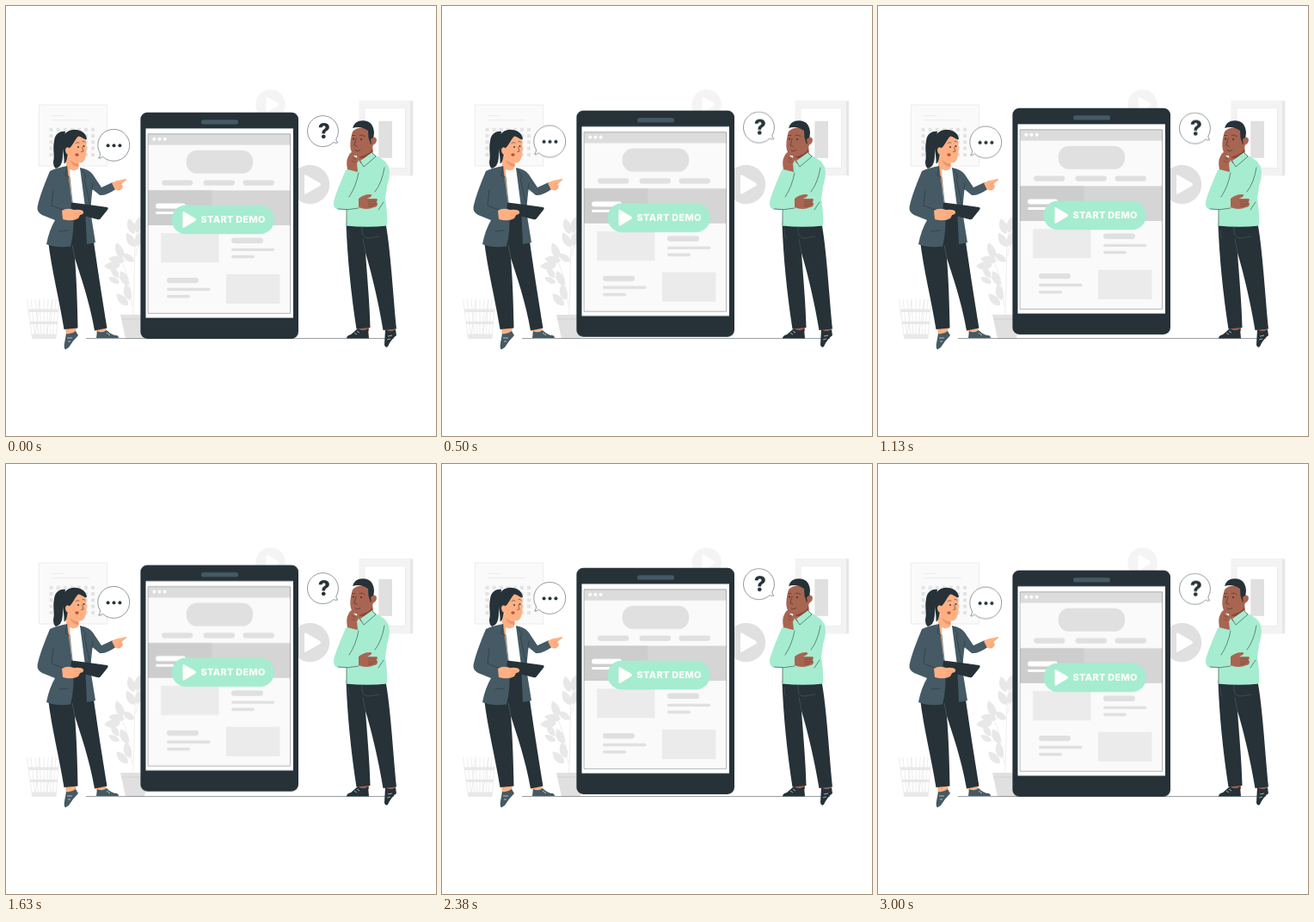
Write an HTML page that moves like this. It is 500x500 px and loops after 3.04 s.

```html
<!DOCTYPE html>
<html lang="en">
<head>
<meta charset="utf-8">
<title>Start demo</title>
<style>
  html, body { margin: 0; width: 100%; height: 100%; overflow: hidden; background: #fff; }
  svg { display: block; width: 100%; height: 100%; }
  .float { animation: float 1520ms linear infinite alternate; }
  .quick { animation-duration: 760ms; }
  @keyframes float { to { transform: translateY(-6.8px); } }

  .ink { fill: #263238; }
  .slate { fill: #455a64; }
  .peach { fill: #ffb083; }
  .brown { fill: #a86551; }
  .mint { fill: #a6ecd0; }
  .g1 { fill: #ebebeb; }
  .g2 { fill: #e0e0e0; }
  .white { fill: #fff; }
  .line { fill: none; stroke: #263238; stroke-width: .55; stroke-linecap: round; stroke-linejoin: round; }
  .pale { fill: none; stroke: #e6e6e6; stroke-width: .7; }
  .bubble { fill: #fff; stroke: #263238; stroke-width: .5; stroke-linejoin: round; }
  text { font-family: Inter, "Open Sans", sans-serif; font-weight: 800; text-anchor: middle; }
</style>
</head>
<body>
<svg viewBox="0 0 500 500">
  <defs>
    <path id="leaf" d="M0 0C-6-4-6-13 1-19C6-13 6-4 0 0Z"/>
    <path id="play" d="M-7-8.2Q-7-10.4-5-9.2L8.2-1.5Q10 0 8.2 1.5L-5 9.2Q-7 10.4-7 8.2Z"/>
  </defs>

  <!-- wall calendar -->
  <rect x="38.3" y="115" width="79.5" height="71" fill="#fafafa" stroke="#e9e9e9" stroke-width=".8"/>
  <path class="pale" d="M53 127.5H68M53 132.7H97"/>
  <path d="M50.5 143.7H104M50.5 151H104M50.5 158.3H104M50.5 165.6H104M50.5 172.9H104" fill="none" stroke="#e3e3e3" stroke-width="4" stroke-dasharray="4 4.1"/>

  <!-- picture frame -->
  <rect x="410.8" y="110.2" width="62.4" height="87" fill="#e6e6e6"/>
  <rect x="410.8" y="110.2" width="59.2" height="87" fill="#f3f3f3"/>
  <rect x="417" y="118.8" width="47.5" height="69.7" fill="#fff" stroke="#e9e9e9" stroke-width=".7"/>
  <rect class="g2" x="433.3" y="133.8" width="15.7" height="43"/>

  <!-- play badges -->
  <circle cx="307.6" cy="114.5" r="17.3" fill="#f4f4f4"/>
  <use href="#play" class="white" transform="translate(309 114.5) scale(.92)"/>
  <circle cx="353.5" cy="207.5" r="22.7" fill="#e0e0e0"/>
  <use href="#play" class="white" transform="translate(355.2 207.5) scale(1.18)"/>

  <!-- bin -->
  <path class="pale" d="M24.5 341L30.5 386H58L62 341M29 341L34 386M34 341L38 386M39 341L41 386M44 341L44 386M49 341L47 386M54 341L51 386M58 341L54 386M39 341L34 386M54 341L47 386"/>
  <path fill="#e8e8e8" d="M25.8 352.5H61L60.7 356H26.3ZM27.8 366.8H60L59.7 370H28.3ZM29.8 381.5H58.5L58 387H30.5Z"/>

  <!-- plant -->
  <path class="pale" d="M147.5 360C150 325 148 285 152 262M147 349C144 322 139 300 128 287M146 337C141 322 133 315 123 311M151 290C153 280 155 273 158 267"/>
  <g fill="#e8e8e8">
    <use href="#leaf" transform="translate(153 264) rotate(5)"/>
    <use href="#leaf" transform="translate(149 265) rotate(-22)"/>
    <use href="#leaf" transform="translate(150 280) rotate(-34)"/>
    <use href="#leaf" transform="translate(152 279) rotate(18)"/>
    <use href="#leaf" transform="translate(149 297) rotate(-58) scale(.85)"/>
    <use href="#leaf" transform="translate(136 293) rotate(-27)"/>
    <use href="#leaf" transform="translate(138 296) rotate(-86)"/>
    <use href="#leaf" transform="translate(133 301) rotate(-98)"/>
    <use href="#leaf" transform="translate(131 316) rotate(-38) scale(.8)"/>
    <use href="#leaf" transform="translate(132 322) rotate(-65) scale(.75)"/>
    <use href="#leaf" transform="translate(142 325) rotate(-30)"/>
    <use href="#leaf" transform="translate(144 342) rotate(-18)"/>
    <use href="#leaf" transform="translate(142 348) rotate(-48)"/>
  </g>
  <path class="g2" d="M133 359H165V363L161 386.5H139L134.5 366Z"/>
  <path d="M134 364H164" stroke="#d3d3d3" stroke-width="1"/>

  <path d="M93 386.6H451" stroke="#263238" stroke-width=".5"/>

  <!-- device -->
  <g class="float">
    <rect class="ink" x="156.4" y="123.7" width="183.6" height="263.2" rx="8"/>
    <rect class="slate" x="227" y="132.2" width="43" height="5.4" rx="2.7"/>
    <rect class="white" x="162.5" y="142.4" width="171.5" height="220.2"/>
    <g transform="translate(0 .4)">
      <rect x="165.5" y="148.4" width="165" height="208.6" fill="#fafafa"/>
      <rect x="165.5" y="148.4" width="165" height="12.8" fill="#dcdcdc"/>
      <g class="white">
        <circle cx="172.3" cy="154.3" r="2"/><circle cx="178.4" cy="154.3" r="2"/><circle cx="184.6" cy="154.3" r="2"/>
      </g>
      <g class="g2">
        <rect x="209.7" y="167.4" width="77.4" height="27" rx="12.5"/>
        <rect x="181" y="202.1" width="36.3" height="6.2" rx="3.1"/>
        <rect x="229.5" y="202.1" width="36.5" height="6.2" rx="3.1"/>
        <rect x="275.5" y="202.1" width="36.5" height="6.2" rx="3.1"/>
        <rect x="262" y="269.2" width="37" height="6.3" rx="3.1"/>
        <rect x="262" y="281.3" width="50.3" height="3.4" rx="1.7"/>
        <rect x="262" y="289.4" width="27" height="3.4" rx="1.7"/>
        <rect x="187" y="315.5" width="37" height="6.3" rx="3.1"/>
        <rect x="187" y="327.4" width="50.5" height="3.4" rx="1.7"/>
        <rect x="187" y="335.7" width="27" height="3.4" rx="1.7"/>
      </g>
      <rect x="165.5" y="214" width="165" height="40.6" fill="#d5d5d5"/>
      <rect x="165.5" y="214" width="73.8" height="40.6" fill="#cdcdcd"/>
      <rect class="white" x="174" y="229" width="35" height="6" rx="3"/>
      <rect class="white" x="174" y="238.6" width="35" height="2.9" rx="1.4"/>
      <rect class="g1" x="180.2" y="263.8" width="67.3" height="34"/>
      <rect class="g1" x="256" y="311.4" width="62.4" height="34.2"/>
      <rect class="line" x="165.5" y="148.4" width="165" height="208.6" style="stroke-width:.35"/>
    </g>
    <rect class="mint" x="192.5" y="231.6" width="119.5" height="33.6" rx="16.8"/>
    <use href="#play" class="white" transform="translate(212.3 248.4) scale(.98)"/>
    <text class="white" x="264.2" y="252.3" font-size="10.9" letter-spacing=".32">START DEMO</text>
  </g>

  <!-- woman -->
  <g>
    <path class="peach" d="M69 372L82 371L81 383L70 386ZM104 373L116 371L117 381L106 382Z"/>
    <path class="slate" d="M70 381Q76 382 81 378L84 383Q77 390 73 397L69 399.5Q67 398 68 392ZM106 378Q112 381 117 377Q123 383 129 383Q131 384 131 386H105Z"/>
    <path d="M71 386L77 386M72 390L75 390M117 380L121 383" stroke="#fff" stroke-width=".6"/>
    <path class="ink" d="M49 273L74 236H97C103 285 112 340 117.5 374.500L103 377.500C97 343 87 315 80 293C82 317 83 347 83.500 374.500L67.500 376C62 341 53 307 49 273Z"/>
    <path d="M80 293L77 278" stroke="#51626a" stroke-width=".6"/>

    <path class="ink" d="M69 146C62 145 57 149 56 157C54 167 57 174 55 181Q55 187 58 189C64 187 66 182 66 172Z"/>
    <path class="peach" d="M70 174L84 178L85 189L90 196L83 235H77L70 188Z"/>
    <path d="M74 187L90 187L95 237L76 236Z" fill="#fff"/>
    <path class="peach" d="M70 174L84 178L84 189Q78 194 71 188Z"/>
    <path fill="#e9946f" d="M74 179Q80 184 84.500 183L84 187Q77 186 74 179Z"/>
    <path class="peach" d="M70 156Q79 149 92 152C94.500 162 94.500 176 90 181Q83 185 76 179Q70 174 70 156Z"/>
    <path class="ink" d="M66 163C63 152 70 144 79 143.700C86 143.500 93.500 147 94 155C91 156 87 151 84 151.500C80 155 78 162 74 165Q73 172 71.500 174Q70 184 67.500 183C68 175 66 170 66 163Z"/>
    <path class="peach" d="M75 166Q70 162 69 167Q69 173 75 174Z"/>
    <path class="line" d="M81 159.500Q83 157.500 85 159M89 157.500Q91 156.500 92 158.500M88.700 164L90 169L87.500 169.500"/>
    <ellipse cx="82.500" cy="173" rx="2.200" ry="1.700" fill="#b3543f"/>
    <circle class="ink" cx="84" cy="164" r=".9"/><circle class="ink" cx="90.500" cy="163" r=".9"/>

    <!-- jacket -->
    <path class="slate" d="M86 188Q97 190 101 196L111 211L124 205L127.500 213Q116 221 109 220L100.500 213L98 238L104 275L94 277L92 234Z"/>
    <path class="slate" d="M71 186Q56 189 51 192C46 204 39 221 36.500 234Q36 240 42 243L57 249Q50 261 47 277Q60 282 75 279.500Q80 260 78 238Z"/>
    <path class="line" d="M55 214L53 232L66 237M71 187L69 197L74 199L78 236M87 189L93 198L91 201L98 232M62 262L72 261M101 206L100 214"/>
    <path class="peach" d="M123 206Q128 202 133 202.500L139.500 200.800Q141 202 138 204L134 207Q137 209 135 212.500Q131 216 126.500 213Z"/>
    <path d="M131 207L135 206M131 210L135 210M130 213L133 213" stroke="#e9946f" stroke-width=".6"/>
    <path class="ink" d="M76 228.500Q91 230 117.500 234Q119.500 234.500 118 237L110 247Q109 249 106 248L75 240Z"/>
    <path class="peach" d="M65 238Q71 234 79 237Q88 236 90 239Q91 242 86 243L84 247Q77 251 66 248Z"/>
    <path d="M79 241L88 241M79 244L86 244M78 247L83 247" stroke="#e9946f" stroke-width=".6"/>
  </g>

  <!-- man -->
  <g>
    <path class="brown" d="M410 370H422V378H409ZM441 371H452V380H442Z"/>
    <path class="ink" d="M409 375Q416 379 421 375L422 386.500H396Q396 383 401 382ZM441 376Q447 380 453 376L454 383Q448 387 444 396Q441 398 440 394Z"/>
    <path d="M405 380L408 382M408 378L411 380M444 384L449 383M443 388L447 387" stroke="#fff" stroke-width=".6"/>
    <path class="ink" d="M395.500 253H441.500C447 282 450 334 454 375.500L438.500 377C433 344 426 314 418 287C420 315 423 347 423.500 374L407.500 375.500C401 333 397 293 395.500 253Z"/>
    <path d="M418 287L415 271M398 260V267L401 270M414 257Q413 270 421 270L434 268" fill="none" stroke="#51626a" stroke-width=".5"/>

    <path class="mint" d="M409 177Q414 171 426 171L440 180Q445 184 445.500 194L441 224Q444 243 443 255.500Q420 258 395.500 255.500L396 236Q383 238 381 231Q380 225 395 191Z"/>
    <path class="brown" d="M409 167L426 161L427 172Q423 181 413 183L408 177Z"/>
    <path fill="#85483a" d="M411 174Q422 174 426 166L426 173Q418 179 411 176Z"/>
    <path class="brown" d="M403 146Q410 138 425 145L427 162Q423 171 413 175Q404 175 401.500 169C399 162 401 153 403 146Z"/>
    <path class="ink" d="M403 142Q405 133.200 415 133.200Q427 133.500 428 147L427 157L424 161L421.500 153L421 145Q412 139 403 142Z"/>
    <path class="brown" d="M424 155Q429 150 431 155Q431 161 425 162Z"/>
    <path class="line" d="M402.500 150.500L406 150.500M411 150.500Q414 149 417 151.500M407 154L405 162L408 163M406 168Q409 170 412 167.500"/>
    <circle class="ink" cx="404" cy="154.500" r=".9"/><circle class="ink" cx="413" cy="155" r=".9"/>

    <path class="mint" d="M426 170L430 175L416 187L412 180Z"/>
    <path class="mint" d="M397 190L410 193Q406 211 399 222L411 223L410 235Q394 239 384 236Q379 233 383 222Z"/>
    <path class="mint" d="M444 185Q449 196 441 214L429 237L412 237L410 228L428 221Z"/>
    <path class="line" d="M426 171L430 175L416 187L412 181M410 194Q407 210 399 222M386 236Q397 238 410 235M440 188Q437 206 429 216M396 237V254M439 228L433 237"/>
    <path class="brown" d="M397 190Q395 180 398 175Q400 169 406 169Q411 170 409 173L404 174L410 178Q410 181 408 183L409 193Z"/>
    <path d="M402 176L407 179M402 180L406 182" stroke="#713b2e" stroke-width=".6"/>
    <path class="brown" d="M410 224Q416 219 423 219Q427 219 424 222L420 224L431 224Q433 226 431 227L432 231Q431 234 428 234Q419 238 410 234Z"/>
    <path d="M421 227H430M421 230H431M421 233L428 232" stroke="#713b2e" stroke-width=".6"/>
  </g>

  <!-- speech bubbles -->
  <g class="float quick">
    <path class="bubble" d="M109.500 171.500A18.500 18.500 0 1 1 112.500 175.200Q110 177.500 107.700 177Q109.800 174.500 109.500 171.500Z"/>
    <g class="ink">
      <circle cx="118.600" cy="162.200" r="2"/><circle cx="125.500" cy="162.200" r="2"/><circle cx="132.400" cy="162.200" r="2"/>
    </g>
  </g>
  <g class="float quick">
    <path class="bubble" d="M381 158.500A18 18 0 1 1 383.800 155Q384 157.500 385.800 159Q383 159.800 381 158.500Z"/>
    <text class="ink" x="369.900" y="154" font-size="24.500">?</text>
  </g>
</svg>
</body>
</html>
```
